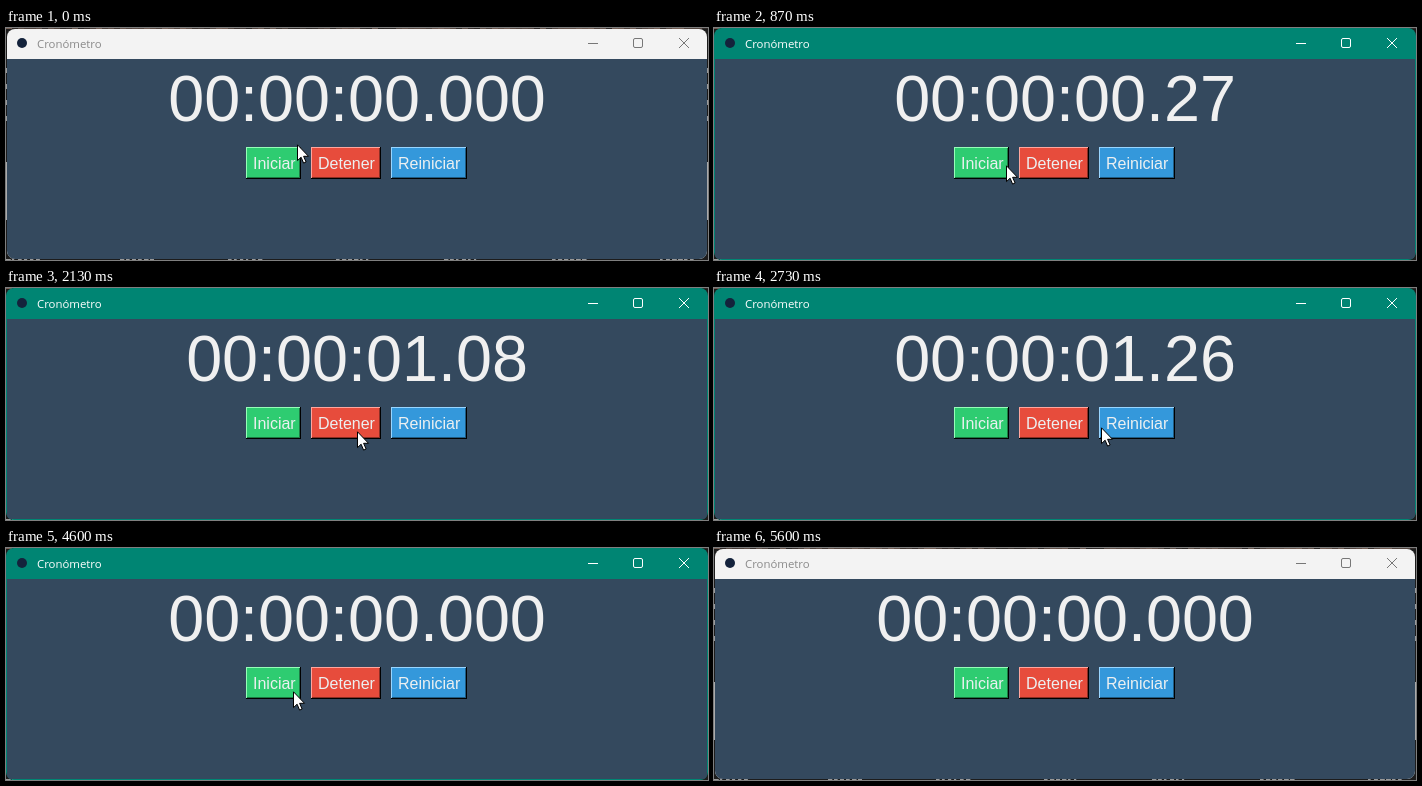
Animation of 702 by 232 pixels, one loop 5.67 s. Source, as an HTML page with a canvas:

```html
<!DOCTYPE html>
<html lang="es">
<head>
<meta charset="utf-8">
<title>Cronómetro</title>
<style>
  html, body { margin: 0; width: 100%; height: 100%; overflow: hidden; background: #1c1c1c; }
  canvas { display: block; }
</style>
</head>
<body>
<canvas id="stage" width="702" height="232"></canvas>
<script>
const ctx = document.getElementById('stage').getContext('2d');
const LOOP = 5670, TICK = 200 / 3;
const SANS = '"Liberation Sans", Arial, sans-serif';

// All times below are in ticks of 1/15 s.
const FOCUS = [5, 84];
const COUNT = { start: 7, stop: 36, reset: 57 };
const CURSOR_EXIT = 79;
const cursorPath = [ // tick, x, y
  [0, 291, 116], [6, 272, 134], [9, 272, 136], [13, 292, 137], [18, 334, 138],
  [20, 351, 143], [37, 351, 143], [46, 432, 133], [60, 432, 133],
  [69, 287, 143], [78, 80, 224]
];
const buttons = [
  { label: 'Iniciar', x: 240, w: 55, fill: '#2ecc71', light: '#96ffb8', shade: '#1c7a44', press: [5, 7] },
  { label: 'Detener', x: 305, w: 70, fill: '#e74c3c', light: '#ffa69e', shade: '#8b2e24', press: [35, 37] },
  { label: 'Reiniciar', x: 385, w: 76, fill: '#3498db', light: '#99d5ff', shade: '#1f5b83', press: [55, 57] }
];

const within = (tick, [from, to]) => tick >= from && tick < to;

function rect(x, y, w, h, color) {
  ctx.fillStyle = color;
  ctx.fillRect(x, y, w, h);
}

function text(str, x, y, font, color, align = 'left') {
  ctx.font = font;
  ctx.fillStyle = color;
  ctx.textAlign = align;
  ctx.fillText(str, x, y);
}

function rounded(x, y, w, h, r) {
  ctx.beginPath();
  ctx.roundRect(x, y, w, h, r);
}

// Slivers of the desktop that show around the inactive window.
function drawBackdrop() {
  rect(0, 0, 702, 232, '#1c1c1c');
  const noise = n => Math.abs(Math.sin(n * 12.9898) * 43758.5453) % 1;
  for (let i = 0; i < 117; i++) {
    const v = noise(i + 1);
    rect(i * 6, 0, 6, 1, `rgb(${40 + v * 80}, ${36 + v * 62}, ${34 + v * 54})`);
    if (i * 6 % 109 < 36) rect(i * 6, 231, 2 + v * 3, 1, '#999');
  }
  for (const x of [0, 701]) {
    rect(x, 134, 1, 58, '#aaa');
    for (let y = 40; y < 100; y += 16) rect(x, y, 1, 5, '#999');
  }
}

function drawWindow(focused) {
  drawBackdrop();
  const inset = focused ? 0 : 1;
  ctx.save();
  rounded(inset, inset, 702 - 2 * inset, 232 - 2 * inset, 8);
  ctx.clip();
  rect(0, 0, 702, 232, focused ? '#008573' : '#f3f3f3');
  rect(1, 31, 700, 200, '#34495e');
  ctx.restore();

  ctx.fillStyle = '#14233c';
  ctx.beginPath();
  ctx.arc(16, 15, 5, 0, 2 * Math.PI);
  ctx.fill();
  text('Cronómetro', 31, 20, '500 11.4px "Open Sans", "Noto Sans", sans-serif',
    focused ? '#fff' : '#8a8a8a');

  ctx.strokeStyle = focused ? '#fff' : '#777';
  ctx.lineWidth = 1;
  rounded(627.5, 10.5, 9, 9, 1.5);
  ctx.moveTo(582, 15.5);
  ctx.lineTo(592, 15.5);
  ctx.moveTo(673, 10);
  ctx.lineTo(683, 20);
  ctx.moveTo(683, 10);
  ctx.lineTo(673, 20);
  ctx.stroke();
}

// Two-pixel bevel: each ring has one colour at top left, another at bottom right.
function drawButton({ label, x, w, fill, light, shade, press }, tick) {
  const y = 119, h = 32, down = within(tick, press);
  rect(x, y, w, h, down ? '#fff' : '#000');
  rect(x, y, w - 1, h - 1, down ? '#a0a0a0' : light);
  rect(x + 1, y + 1, w - 2, h - 2, down ? '#e3e3e3' : shade);
  rect(x + 1, y + 1, w - 3, h - 3, down ? '#696969' : fill);
  if (down) rect(x + 2, y + 2, w - 4, h - 4, '#f0f0f0');
  const shift = down ? 1 : 0;
  text(label, x + 7 + shift, y + 22 + shift, `16px ${SANS}`, down ? '#000' : '#ecf0f1');
}

function clockText(tick) {
  if (tick < COUNT.start || tick >= COUNT.reset) return '00:00:00.000';
  const cs = Math.floor(27 + (Math.min(tick, COUNT.stop) - 13) * 4.31);
  const pad = n => String(n).padStart(2, '0');
  return `00:00:${pad(Math.floor(cs / 100))}.${pad(cs % 100)}`;
}

function cursorAt(tick) {
  const i = cursorPath.findIndex(p => p[0] >= tick);
  if (i === 0) return cursorPath[0].slice(1);
  const [t0, x0, y0] = cursorPath[i - 1], [t1, x1, y1] = cursorPath[i];
  const p = (tick - t0) / (t1 - t0);
  return [Math.round(x0 + (x1 - x0) * p), Math.round(y0 + (y1 - y0) * p)];
}

const arrow = new Path2D('M.5 .8V16.6L4.1 13.2L6.6 19.1L9.1 18L6.6 12.3H11.5Z');

function drawCursor(tick) {
  if (tick >= CURSOR_EXIT) return;
  ctx.save();
  ctx.translate(...cursorAt(tick));
  ctx.fillStyle = '#fff';
  ctx.strokeStyle = '#000';
  ctx.lineWidth = 1;
  ctx.fill(arrow);
  ctx.stroke(arrow);
  ctx.restore();
}

function render() {
  const time = performance.now() % LOOP;
  const tick = Math.min(84, Math.floor((time + 3.4) / TICK));
  drawWindow(within(tick, FOCUS));
  text(clockText(tick), 351, 92.5, `64.7px ${SANS}`, '#f0f0f0', 'center');
  buttons.forEach(button => drawButton(button, tick));
  drawCursor(tick);
  requestAnimationFrame(render);
}
render();
</script>
</body>
</html>
```
